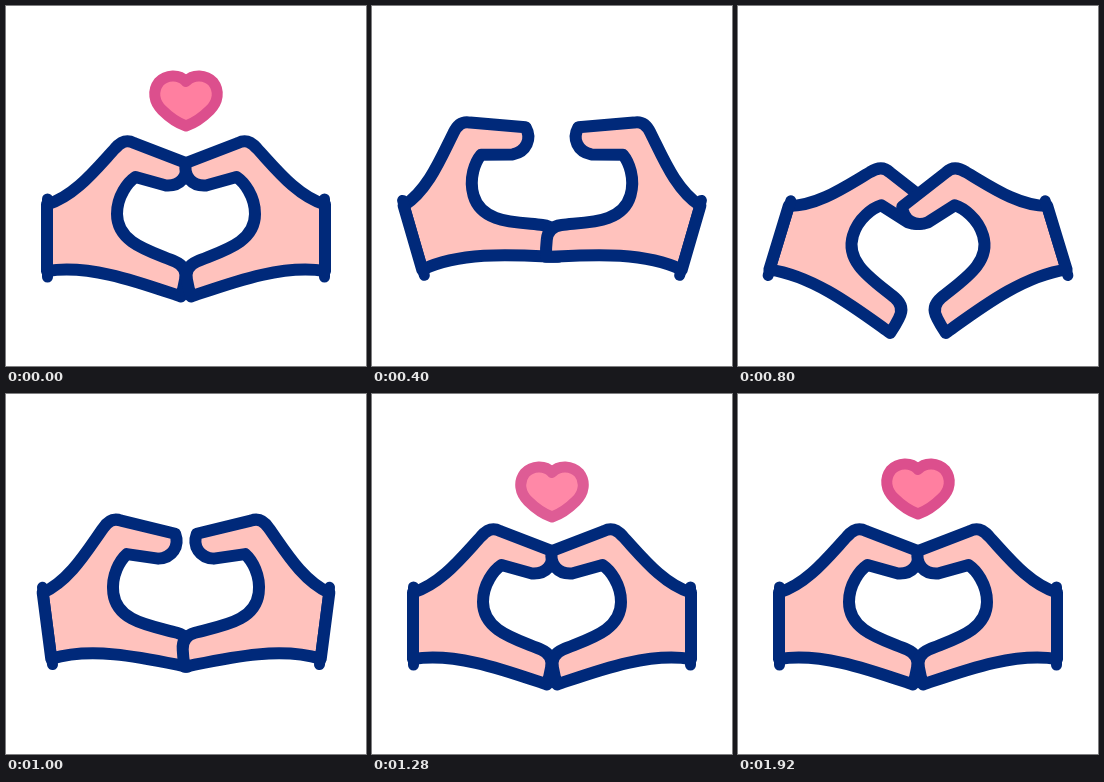
An HTML page for the animation above (2000 ms loop, 360 by 360 pixels).

```html
<!DOCTYPE html>
<html>
<head>
<meta charset="utf-8">
<title>Heart hands</title>
<style>
  html, body { margin: 0; width: 100%; height: 100%; overflow: hidden; background: #fff; }
  svg { display: block; width: 100%; height: 100%; }
</style>
</head>
<body>
<svg viewBox="0 0 360 360" stroke-width="11" stroke-linecap="round" stroke-linejoin="round">
  <defs>
    <g id="hand" fill="#ffc2bd" stroke="#00297a">
      <path stroke-width="12" d="M41 198.500C69 190 90 163 109 142.500C115 135.500 121 133.500 128 137L180 157
        C183 170 174 180.500 160 179.500L129.500 171C122 176 111 190 111 208
        C111 237 144 245 169 255.500C177 259 181 265 179 274C178 280 177 284 175 290.500
        C135 277 85 258 41 265Z"/>
      <path d="M41.500 193V271"/>
    </g>
  </defs>
  <path id="heart" fill="#ff7fa0" stroke="#dc4f8d" d="M180 75.500C173 67.500 160 68.500 153 76
    C146 85 148 96 156 104C163 111 170 116.500 180 120
    C190 116.500 197 111 204 104C212 96 214 85 207 76C200 68.500 187 67.500 180 75.500Z"/>
  <g class="turn"><use href="#hand"/></g>
  <g transform="matrix(-1 0 0 1 360 0)"><g class="turn"><use href="#hand"/></g></g>
</svg>
<script>
  const LOOP = 2000, STEP = 40;
  const heart = document.getElementById('heart');
  const hands = document.querySelectorAll('.turn');

  // [time in ms, value]
  const swing = [[0, 0], [360, -17], [760, 17], [790, 17], [1040, -9], [1240, 0]];
  const leave = [[0, 0], [360, 1]];
  const enter = [[1000, 0], [1340, 1]];

  const ease = p => (1 - Math.cos(Math.PI * p)) / 2;

  function at(keys, t) {
    const i = keys.findIndex(k => k[0] > t);
    if (i < 0) return keys[keys.length - 1][1];
    if (i === 0) return keys[0][1];
    const [t0, a] = keys[i - 1], [t1, b] = keys[i];
    return a + (b - a) * ease((t - t0) / (t1 - t0));
  }

  function draw(t) {
    const angle = at(swing, t);
    hands.forEach(h => h.setAttribute('transform', `rotate(${angle} 41 232)`));
    // The heart rises out of view, then a new one rises into place.
    const shift = t < 700 ? -at(leave, t) : 1 - at(enter, t);
    heart.setAttribute('transform', `translate(0 ${40 * shift})`);
    heart.setAttribute('opacity', 1 - Math.abs(shift));
  }

  const start = performance.now();
  function tick() {
    const t = (performance.now() - start) % LOOP;
    draw(Math.min(Math.floor(t / STEP) * STEP, LOOP - 2 * STEP));
    requestAnimationFrame(tick);
  }
  tick();
</script>
</body>
</html>
```
